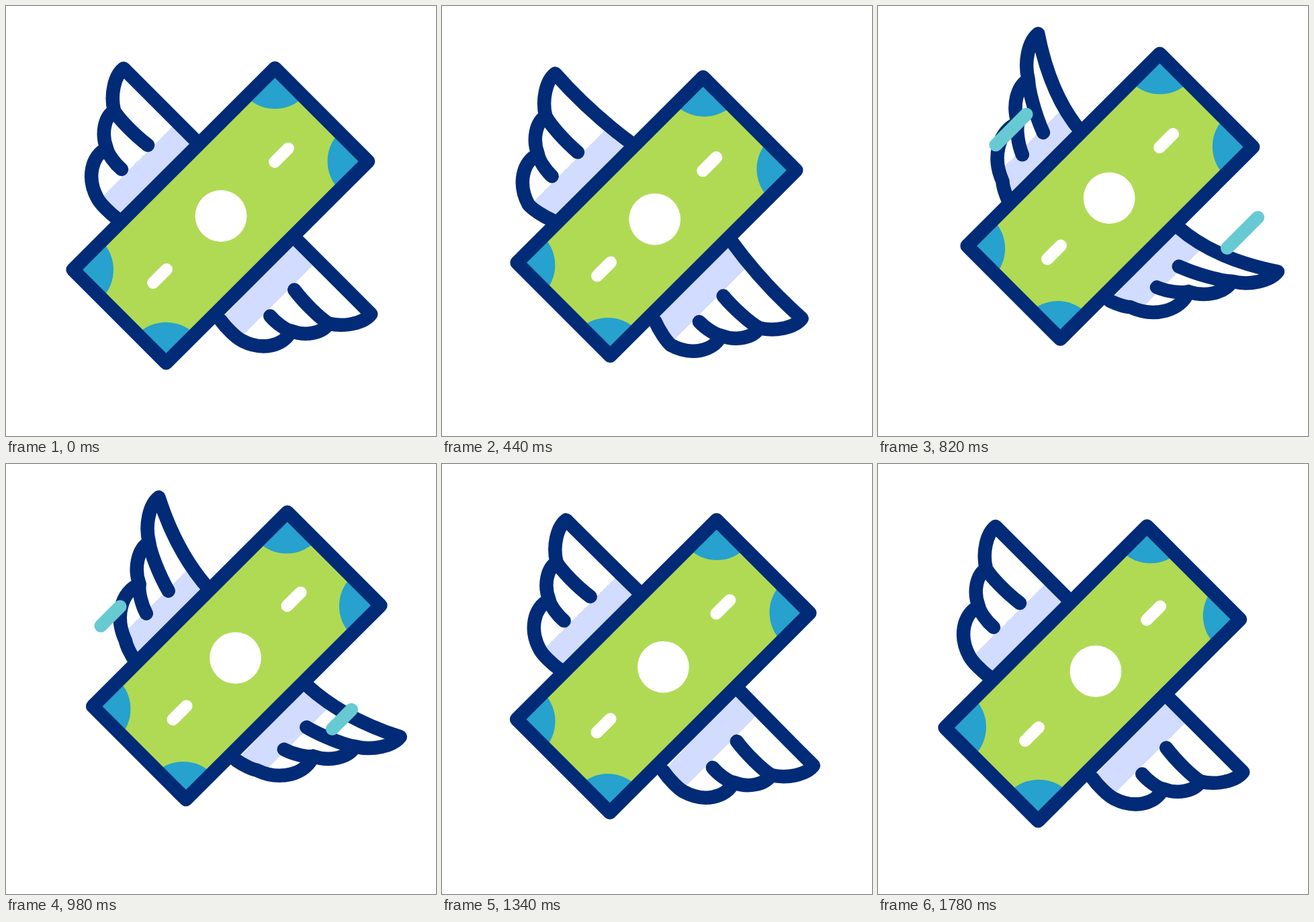
Animation of 640 by 640 pixels, one loop 1800 ms. Source, as an HTML page:

```html
<!DOCTYPE html>
<html lang="en">
<head>
<meta charset="utf-8">
<title>Flying banknote</title>
<style>
  html, body { margin: 0; width: 100%; height: 100%; overflow: hidden; background: #fff; }
  svg { display: block; width: 100vw; height: 100vh; }
  .line { fill: none; stroke: #022b77; stroke-width: 20.5; stroke-linecap: round; stroke-linejoin: round; }
  .dash { stroke: #fff; stroke-width: 18; stroke-linecap: round; }
  .streak { stroke: #67cad3; stroke-width: 19.5; stroke-linecap: round; }
  .corner { fill: #27a1cd; }
</style>
</head>
<body>
<svg viewBox="0 0 640 640">
  <defs>
    <linearGradient id="feather" gradientUnits="userSpaceOnUse" x1="0" y1="0" x2="427" y2="427">
      <stop offset=".5" stop-color="#fff"/>
      <stop offset=".5" stop-color="#d2dcff"/>
    </linearGradient>
    <clipPath id="paper"><polygon class="bill"/></clipPath>
    <g id="wing">
      <path id="wingFill" fill="url(#feather)"/>
      <path id="wingLine" class="line"/>
    </g>
  </defs>
  <use href="#wing"/>
  <use href="#wing" transform="matrix(0 -1 -1 0 636.2 633.5)"/>
  <polygon class="bill" fill="#b0da54"/>
  <g clip-path="url(#paper)">
    <g id="topCorners">
      <circle class="corner" cx="400.3" cy="92.5" r="60.5"/>
      <circle class="corner" cx="539" cy="231" r="60.5"/>
    </g>
    <g id="lowCorners">
      <circle class="corner" cx="99.5" cy="392.5" r="60.5"/>
      <circle class="corner" cx="238.3" cy="531.2" r="60.5"/>
    </g>
  </g>
  <circle id="coin" cx="320" cy="312.5" r="38.4" fill="#fff"/>
  <path id="topDash" class="dash" d="M400 232l20-20"/>
  <path id="lowDash" class="dash" d="M219 412l20-20"/>
  <polygon class="bill line"/>
  <path id="streaks" class="streak"/>
</svg>
<script>
const LOOP = 1800;
const EDGE = 492.5; // x + y along the bill's upper left side
const $ = id => document.getElementById(id);
const bills = document.querySelectorAll('.bill');

const clamp = x => Math.min(1, Math.max(0, x));
const mix = (a, b, k) => a + (b - a) * k;
const smooth = x => x * x * (3 - 2 * x);
const cubic = x => x < .5 ? 4 * x ** 3 : 1 - 4 * (1 - x) ** 3;
const during = (t, from, to) => clamp((t - from) / (to - from));

// Dip, swoop up to a peak, then settle.
function flight(t, dip, peak, end, fallFrom, fallTo, rise = cubic(during(t, 280, 850))) {
  return dip * smooth(during(t, 0, 260)) + (peak - dip) * rise +
    (end - peak) * smooth(during(t, fallFrom, fallTo));
}

// Cubic whose control points lean sideways by a share of its length.
function curve(p, q, bulge) {
  const dx = q.x - p.x, dy = q.y - p.y;
  const at = k => `${p.x + dx * k - dy * bulge} ${p.y + dy * k + dx * bulge}`;
  return `C${at(.2)} ${at(.66)} ${q.x} ${q.y}`;
}

// Slides a wing point along the bill, sweeps the tip forward and squeezes it towards the bill.
function bendPoint(x, y, { root, wing, bend }) {
  const along = x - y, height = EDGE - x - y;
  const free = clamp(height / 75);
  const sweep = smooth(clamp((height - .3 * along - 60) / 140));
  const tuck = .35 * (1 - sweep) * Math.max(0, along) / 82;
  const forward = mix(root, wing, free) + bend * (sweep - tuck) / 2;
  const inward = bend * (.27 - .001 * along) * free / 2;
  return { x: x + forward + inward, y: y - forward + inward };
}

function drawWing(pose) {
  const at = (x, y) => bendPoint(x, y, pose);
  const root = at(287, 205), lead = at(231, 149), tip = at(175, 93);
  const notch1 = at(161, 156), notch2 = at(150, 212);
  const belly = at(136, 286), trail = at(166, 317);
  const outline = `M${root.x} ${root.y}Q${lead.x} ${lead.y} ${tip.x} ${tip.y}` +
    curve(tip, notch1, .17) + curve(notch1, notch2, .22) +
    curve(notch2, belly, .28) + curve(belly, trail, .06);
  const feather = (notch, end, bulge) => `M${notch.x} ${notch.y}${curve(notch, end, bulge)}`;
  $('wingFill').setAttribute('d', outline + 'Z');
  $('wingLine').setAttribute('d', outline +
    feather(notch1, at(211, 207), .05) + feather(notch2, at(172, 243), .09));
}

function drawBill({ top, low, coin, topCorners, lowCorners }) {
  const drift = -.06 * top;
  const corner = (x, y, d) => `${x + d + drift} ${y - d + drift}`;
  const points = [corner(400.3, 92.5, top), corner(539, 231.2, top),
    corner(238.3, 531.2, low), corner(99.6, 392.5, low)].join(' ');
  bills.forEach(b => b.setAttribute('points', points));
  const slide = (id, d) => $(id).setAttribute('transform', `translate(${corner(0, 0, d)})`);
  slide('topDash', top);
  slide('lowDash', low);
  slide('coin', coin);
  slide('topCorners', topCorners);
  slide('lowCorners', lowCorners);
}

function drawStreaks(t) {
  const span = 131.5;
  const head = during(t, 587, 1205) * span;
  const tail = during(t, 808, 1220) * span;
  const line = (x, y) => `M${x - tail} ${y + tail}L${x - head} ${y + head}`;
  const shown = head > 0 && tail < head;
  $('streaks').setAttribute('d', shown ? line(225, 157) + line(569.5, 310.5) : '');
}

function frame() {
  const t = performance.now() % LOOP;
  const top = flight(t, -15.8, 20.3, 0, 890, 1720);
  const low = flight(t, 2, 34.3, 0, 800, 1700, smooth(during(t, 240, 810)));
  drawWing({
    root: (top + low) / 2,
    wing: flight(t, -13.5, 26.5, 0, 820, 1700),
    bend: flight(t, 0, 62, 0, 840, 1290)
  });
  drawBill({
    top, low,
    coin: flight(t, -7, 25.5, 4, 790, 1630),
    topCorners: flight(t, -14, 20.6, 5.2, 790, 1630),
    lowCorners: flight(t, 5.3, 30.5, 1, 790, 1630)
  });
  drawStreaks(t);
  requestAnimationFrame(frame);
}
frame();
</script>
</body>
</html>
```
